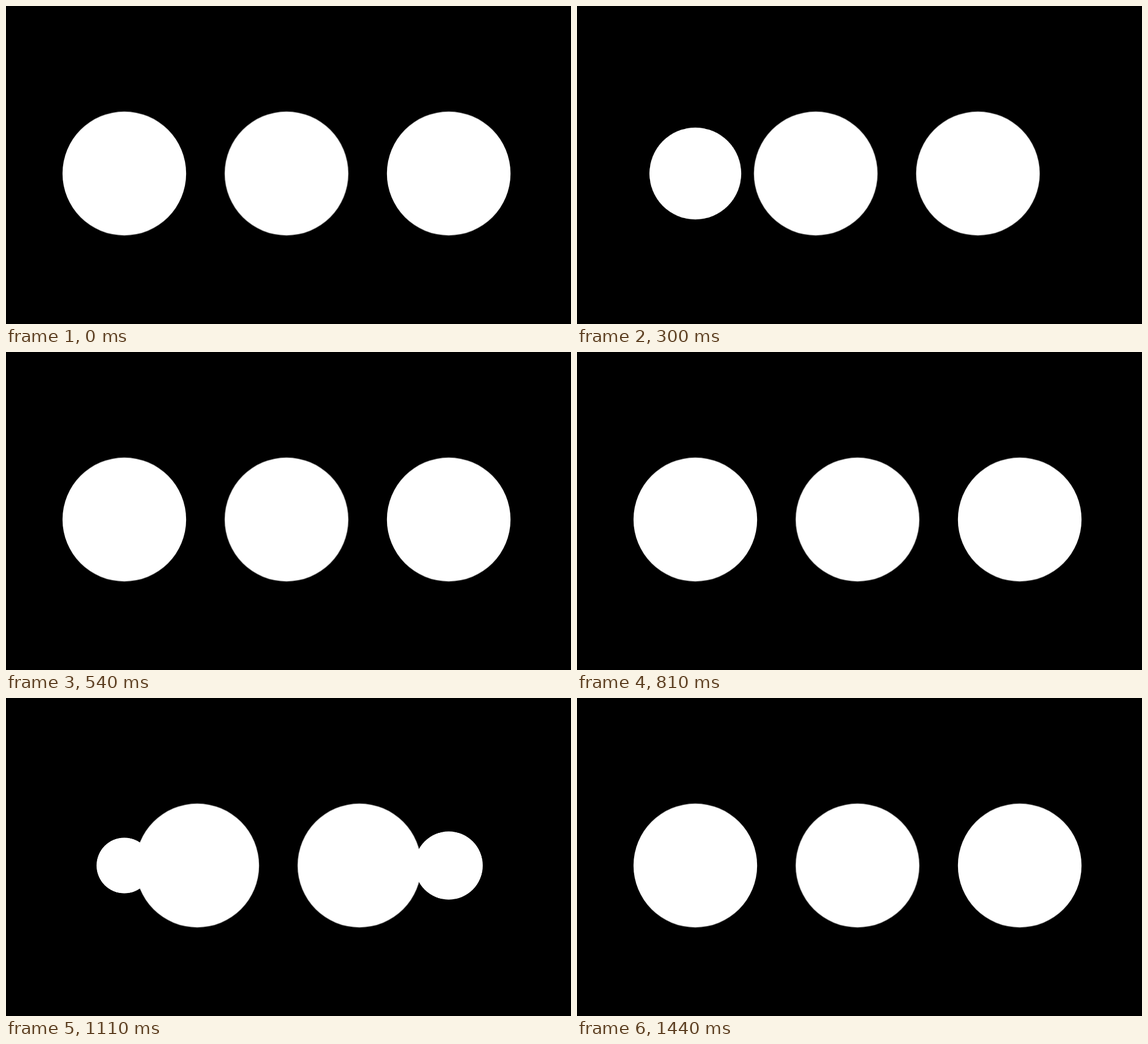
An HTML page that plays this animation: 998x561 px, repeating every 1800 ms.

```html
<!DOCTYPE html>
<html lang="en">
<head>
<meta charset="utf-8">
<title>Loading dots</title>
<style>
  html, body { margin: 0; width: 100%; height: 100%; overflow: hidden; background: #000; }
  svg { display: block; width: 998px; height: 561px; }
  circle { fill: #fff; }
</style>
</head>
<body>
<svg viewBox="0 0 998 561"></svg>
<script>
const CYCLE = 900, STEP = 30, TRAVEL = 466, LEAD = 8;
const LEFT = 209, GAP = 286.5, MID_Y = 295.5, RADIUS = 109.2;
const svg = document.querySelector('svg');

// Sine ease-in-out from 0 to 1, then rest
function progress(t) {
  const u = Math.min((t + LEAD) / TRAVEL, 1);
  return t === 0 ? 0 : (1 - Math.cos(Math.PI * u)) / 2;
}

// pose(p) returns [x, scale]; each pose is held for one step
function addDot(pose) {
  const dot = document.createElementNS(svg.namespaceURI, 'circle');
  dot.setAttribute('r', RADIUS);
  svg.append(dot);
  const frames = [];
  for (let t = 0; t <= CYCLE; t += STEP) {
    const [x, scale] = pose(progress(t));
    frames.push({
      offset: t / CYCLE,
      transform: `translate(${x}px, ${MID_Y}px) scale(${scale})`,
      easing: 'steps(1, end)'
    });
  }
  dot.animate(frames, { duration: CYCLE, iterations: Infinity, delay: -1 });
}

addDot(p => [LEFT, p]);
addDot(p => [LEFT + GAP * p, 1]);
addDot(p => [LEFT + GAP * (1 + p), 1]);
addDot(p => [LEFT + GAP * 2, 1 - p]);
</script>
</body>
</html>
```
